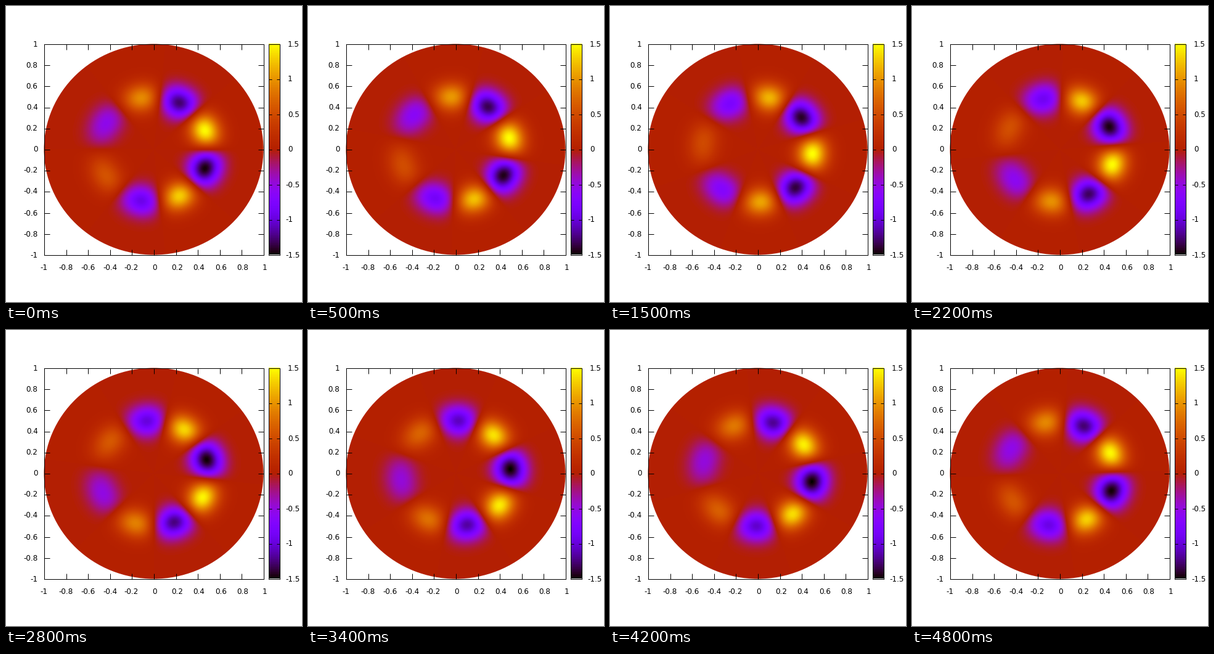
Recreate the animation shown at these times as a matplotlib script. Size 480 by 480 pixels, loop 4900 ms.

```python
import numpy as np
import matplotlib.pyplot as plt
from matplotlib.animation import FuncAnimation
from matplotlib.patches import Ellipse, Rectangle

SIZE, DPI, FRAMES = 480, 96, 49
PX = 72 / DPI                      # one pixel in points
L, R, T, B = 61.5, 417.5, 61.5, 403.5
CX, CY = (L + R) / 2, (T + B) / 2
BAR_L, BAR_R = 425.5, 443.5
TICK, BAR_TICK = 9, 5

plt.rcParams["font.family"] = "DejaVu Sans"
fig = plt.figure(figsize=(SIZE / DPI, SIZE / DPI), dpi=DPI, facecolor="white")
ax = fig.add_axes([0, 0, 1, 1])
ax.set_xlim(0, SIZE)
ax.set_ylim(SIZE, 0)
ax.axis("off")

# Polar grid sampled at pixel centres
cols = np.arange(61, 418) + 0.5
rows = np.arange(61, 404) + 0.5
x, y = np.meshgrid((cols - CX) / (R - CX), (CY - rows) / (B - CY))
r, th = np.hypot(x, y), np.arctan2(y, x)

envelope = (1.03 + 0.51 * np.cos(th) - 0.04 * np.cos(2 * th)) \
    * np.exp(-((r - 0.5) / 0.14) ** 2)
phase = 4 * (th + 0.117 * np.sin(th) - 0.034 * np.sin(2 * th))


def field(i):
    return envelope * np.cos(phase - np.pi / 2 + 2 * np.pi * i / FRAMES)


def show(data, extent):
    return ax.imshow(data, cmap="gnuplot", vmin=-1.5, vmax=1.5, extent=extent,
                     interpolation="nearest", aspect="auto", zorder=1)


def line(xs, ys):
    ax.plot(xs, ys, color="black", lw=PX, solid_capstyle="butt", zorder=3)


def frame(x0, x1):
    ax.add_patch(Rectangle((x0, T), x1 - x0, B - T, fill=False, ec="black",
                           lw=PX, joinstyle="miter", zorder=4))


def label(px, py, value, ha):
    ax.text(px, py, f"{value:g}", ha=ha, va="baseline", fontsize=12 * PX,
            color="black", zorder=5)


def snap(v):
    return np.floor(v) + 0.5


disc = show(field(0), (61, 418, 404, 61))
disc.set_clip_path(Ellipse((CX, CY), R - L, B - T, transform=ax.transData))
show(np.linspace(1.5, -1.5, 342)[:, None], (BAR_L, BAR_R, B, T))

for n in range(-5, 6):
    v = n / 5
    px, py = snap(CX + v * (R - CX)), snap(CY - v * (B - CY))
    line([px, px], [T, T + TICK])
    line([px, px], [B, B - TICK])
    line([L, L + TICK], [py, py])
    line([R, R - TICK], [py, py])
    label(px + (1.9 if n >= 0 else 0), 428.5, v, "center")
    label(51.5, py + 4, v, "right")

for n in range(-3, 4):
    v = n / 2
    py = snap(CY - v / 1.5 * (B - CY))
    line([BAR_L, BAR_L + BAR_TICK], [py, py])
    line([BAR_R, BAR_R - BAR_TICK], [py, py])
    label(453 + (3.8 if n >= 0 else 0), py + 4, v, "left")

frame(L, R)
frame(BAR_L, BAR_R)


def update(i):
    disc.set_data(field(i))
    return disc,


anim = FuncAnimation(fig, update, frames=FRAMES, interval=100, repeat=True,
                     repeat_delay=0, blit=False)
plt.show()
```
